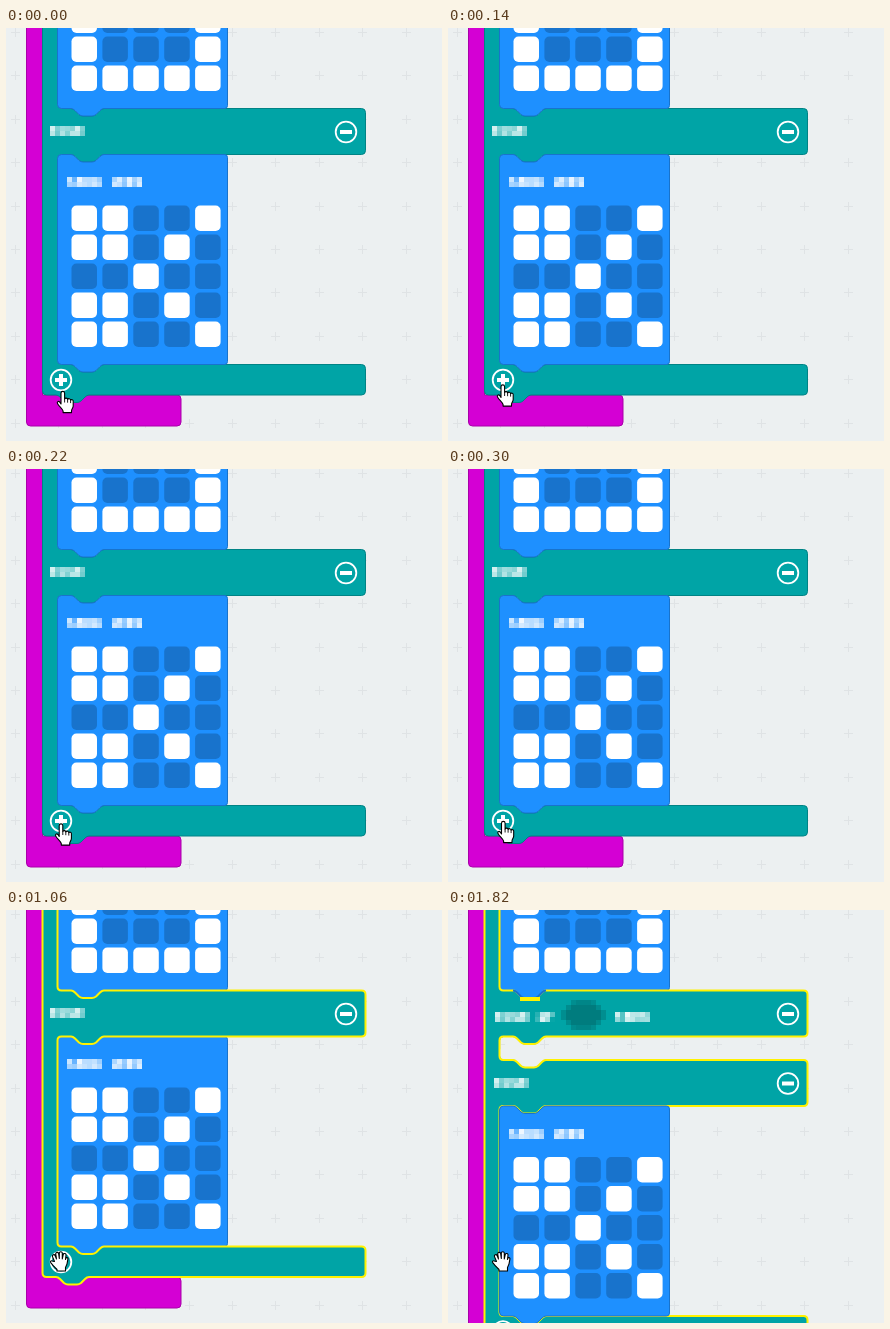
Write an HTML page with a canvas that moves like this. It is 436x413 px and loops after 2290 ms.

```html
<!DOCTYPE html>
<html lang="en">
<head>
<meta charset="utf-8">
<title>Adding a branch to a block</title>
<style>
html, body { margin: 0; width: 100%; height: 100%; overflow: hidden; background: #ecf0f1; }
canvas { display: block; }
</style>
</head>
<body>
<canvas id="stage" width="436" height="413"></canvas>
<script>
const g = document.getElementById('stage').getContext('2d');
const small = document.createElement('canvas');
const LOOP = 2290, GROW = 69.5, CELL = 5;
const TEAL = '#00a4a6', TEAL_DARK = '#008385', BLUE = '#1e90ff', BLUE_DARK = '#1873cc', YELLOW = '#fff200';
const SQUARE = ['11111', '10001', '10001', '10001', '11111'];
const SCISSORS = ['11001', '11010', '00100', '11010', '11001'];

// Start time and top left corner of the pointing hand
const POINTER = [[0, 50.5, 363], [60, 49.5, 361], [140, 48.5, 356.5], [220, 48.7, 354.5], [300, 49, 352]];
const POINT_HAND = 'M4.5 13V2.2a1.8 1.8 0 0 1 3.6 0V8a1.6 1.6 0 0 1 3 .5a1.6 1.6 0 0 1 3 .6a1.5 1.5 0 0 1 2.6 1v5c0 2-1.7 3-1.7 5v1.5H6.6v-1.5C6.4 18 2.6 15.5 1 12.4c-.8-1.6 1-2.6 2.2-1.4z';
const POINT_LINES = 'M8.1 8v3.5M11.1 8.5v3.2M14.1 9.1v3';
const OPEN_HAND = 'M5 10.5L3 5.6a1.4 1.4 0 0 1 2.6-1.1L7 8L6.2 2.8a1.5 1.5 0 0 1 2.9-.5L9.8 7.5V2.2a1.5 1.5 0 0 1 3 0V8l.9-4.3a1.4 1.4 0 0 1 2.8.5L16 8.5l.3-1.3a1.2 1.2 0 0 1 2.2.4C18 12 17.5 14 16 16.5V20H7.5v-1.5C5.5 16.5 3 14 1.2 11.6c-.8-1.5.8-2.4 2-1.4z';

// Connector bump, drawn rightwards (d = 1) or leftwards (d = -1)
const tab = d => `q${2 * d} 0 ${4 * d} 2l${4 * d} 4q${2 * d} 1.5 ${4 * d} 1.5h${9 * d}` +
  `q${2 * d} 0 ${4 * d} -1.5l${4 * d} -4q${2 * d} -2 ${4 * d} -2`;

function shape(d, fill, line, width = 1) {
  const path = new Path2D(d);
  g.lineWidth = width;
  g.lineJoin = 'round';
  if (fill) { g.fillStyle = fill; g.fill(path); }
  if (line) { g.strokeStyle = line; g.stroke(path); }
}

function background() {
  g.fillStyle = '#ecf0f1';
  g.fillRect(0, 0, 436, 413);
  g.fillStyle = '#dfe3e5';
  for (let x = 9; x < 436; x += 43.4)
    for (let y = 4; y < 413; y += 43.4) {
      g.fillRect(Math.round(x) - 4, Math.round(y), 9, 1);
      g.fillRect(Math.round(x), Math.round(y) - 4, 1, 9);
    }
}

// Arms are [top, bottom], lowest first
function armsPath(arms) {
  let d = 'M36.5 -9', x = 36.5, s = -1;
  for (const [top, bottom] of arms) {
    d += `V${bottom + 4 * s}q0 ${-4 * s} 4 ${-4 * s}H${x + 13.5}${tab(1)}H355.5q4 0 4 -4` +
      `V${top + 4}q0 -4 -4 -4H98${tab(-1)}H55.5q-4 0 -4 -4`;
    x = 51.5;
    s = 1;
  }
  return d + 'V-9z';
}

function ledBlock(y, rows) {
  shape(`M51.5 ${y + 4}q0 -4 4 -4H65${tab(1)}H218.5q3 0 3 3V${y + 207}q0 3 -3 3H98${tab(-1)}H55.5q-4 0 -4 -4z`,
    BLUE, BLUE_DARK);
  rows.forEach((row, j) => [...row].forEach((on, i) => {
    g.fillStyle = +on ? '#fff' : BLUE_DARK;
    g.beginPath();
    g.roundRect(65.5 + 30.9 * i, y + 51 + 29 * j, 25.5, 25.5, 5);
    g.fill();
  }));
}

// Paints at low resolution and enlarges it to coarse cells
function mosaic(x, y, w, h, paint) {
  small.width = w / CELL;
  small.height = h / CELL;
  const s = small.getContext('2d');
  s.scale(1 / CELL, 1 / CELL);
  paint(s);
  g.imageSmoothingEnabled = false;
  g.drawImage(small, x, Math.round(y), w, h);
}

function label(text, x, y, w, h, base) {
  mosaic(x, y, w, h, s => {
    s.fillStyle = '#fff';
    s.font = 'bold 14px "DejaVu Sans Mono", monospace';
    for (let i = 0; i < 2; i++) s.fillText(text, 0, base);
  });
}

function button(x, y, plus) {
  g.strokeStyle = g.fillStyle = '#fff';
  g.lineWidth = 1.8;
  g.beginPath();
  g.arc(x, y, 10.3, 0, 7);
  g.stroke();
  g.fillRect(x - 6, y - 2, 12, 4);
  if (plus) g.fillRect(x - 2, y - 6, 4, 12);
}

function hand(x, y, outline, lines) {
  g.save();
  g.translate(x, y);
  shape(outline, '#fff', '#000', 1.1);
  if (lines) shape(lines, null, '#000', .9);
  g.restore();
}

function draw(t) {
  const held = t >= 1060, grown = t >= 1120, dy = grown ? GROW : 0;
  const arms = [[336.5 + dy, 367 + dy], [80.5 + dy, 126.5 + dy]];
  if (grown) arms.push([80.5, 126.5]);
  const outline = armsPath(arms);

  background();
  shape(`M20.5 -9V${394 + dy}q0 4 4 4H171q4 0 4 -4V${371 + dy}q0 -4 -4 -4H36.5V-9z`, '#d400d4', '#a900a9');
  shape(outline, TEAL, TEAL_DARK);
  ledBlock(-129.5, SQUARE);
  if (!grown) ledBlock(126.5, SCISSORS);
  if (held) shape(outline, null, YELLOW, 2);
  if (grown) {
    ledBlock(126.5 + dy, SCISSORS);
    shape(`M65 80.5${tab(1)}`, BLUE, BLUE_DARK, 2);
    g.fillStyle = YELLOW;
    g.fillRect(72, 87, 20, 4);
    label('else if', 47, 102, 60, 10, 10);
    mosaic(113, 90, 45, 30, s => {
      s.fillStyle = '#007c7e';
      s.fill(new Path2D('M0 15L13 1H32L45 15L32 29H13z'));
    });
    label('then', 167, 102, 35, 10, 10);
    button(340, 104);
  }
  label('else', grown ? 46 : 44, 98 + dy, 40, 15, 12);
  label('show leds', 61, 149 + dy, 75, 10, 10);
  button(340, 104 + dy);
  button(55, 352 + dy, true);

  if (held) hand(43.5, 341, OPEN_HAND);
  else {
    const [, x, y] = POINTER.findLast(p => t >= p[0]);
    hand(x, y, POINT_HAND, POINT_LINES);
  }
}

const start = performance.now();
function tick() {
  draw((performance.now() - start) % LOOP);
  requestAnimationFrame(tick);
}
tick();
</script>
</body>
</html>
```
